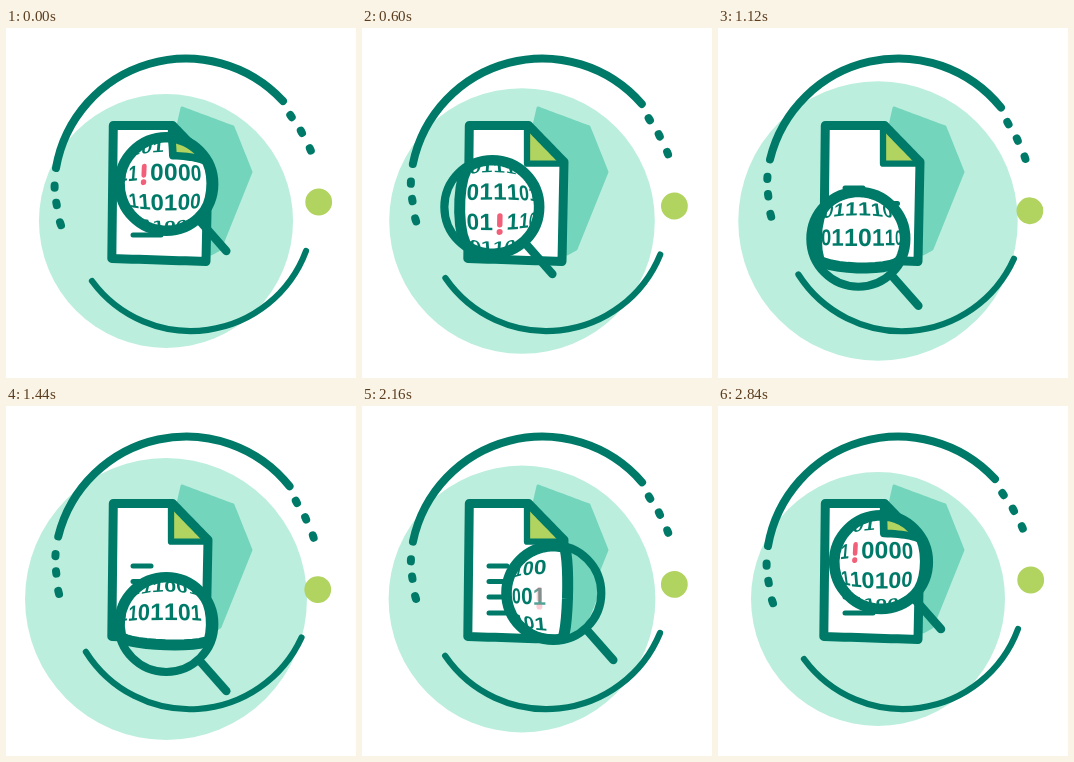
Write an HTML page with a canvas that moves like this. It is 350 px wide and 350 px high and loops after 2880 ms.

```html
<!DOCTYPE html>
<html lang="en">
<head>
<meta charset="utf-8">
<title>Code inspection</title>
<style>
  html, body { margin: 0; width: 100%; height: 100%; overflow: hidden; background: #fff; }
  canvas { display: block; width: 350px; height: 350px; }
</style>
</head>
<body>
<canvas id="stage"></canvas>
<script>
const SIZE = 350, LOOP = 2880, STEP = 40, SWING_LEAD = 40;
const DARK = '#007a68', MINT = '#bceedd', TEAL = '#74d5bd', LIME = '#b1d35f', PINK = '#f25f78';
const HEXAGON = [[176, 80], [227, 99], [245, 144], [214, 221], [205, 226], [160, 150]];
const SHEET = [[107.3, 97.5], [166.5, 97.5], [202, 134], [200, 233.5], [105.8, 230.5]];
const FOLD = [[165, 98], [165, 135.7], [202, 135.7]];
const LINES = [[160, 145], [175.5, 179.5], [191, 178], [207, 155]];

const ROWS = ['01101', '01110000', '01110100', '01111001', '01101101'];
const COLUMN = { start: 116.8, pitch: 9.3 }, ROW = { start: 127.3, pitch: 20.6 };
const ALERTS = [
  { row: 1, col: 3, from: 2500, to: 3280 },
  { row: 3, col: 2, from: 320, to: 960 },
  { row: 3, col: 7, from: 1600, to: 2185 }
];
const FADE = 80, ZOOM = 1.51, BULGE = 47;

const canvas = document.getElementById('stage');
const ctx = canvas.getContext('2d');
const ratio = window.devicePixelRatio || 1;
canvas.width = canvas.height = SIZE * ratio;

const clamp = v => Math.max(0, Math.min(1, v));
const turn = time => time / LOOP * Math.PI * 2;
const flat = (x, y) => [x, y];

function disc(x, y, r, color) {
  ctx.beginPath();
  ctx.arc(x, y, r, 0, Math.PI * 2);
  ctx.fillStyle = color;
  ctx.fill();
}

function stroke(path, width, color = DARK) {
  ctx.lineWidth = width;
  ctx.strokeStyle = color;
  ctx.stroke(path);
}

function segment(x1, y1, x2, y2, width, color) {
  const path = new Path2D();
  path.moveTo(x1, y1);
  path.lineTo(x2, y2);
  stroke(path, width, color);
}

// Edges are subdivided so that the lens can bend them.
function outline(points, map, closed) {
  const path = new Path2D(), parts = 14;
  path.moveTo(...map(...points[0]));
  const edges = closed ? points.length : points.length - 1;
  for (let i = 0; i < edges; i++) {
    const [x1, y1] = points[i], [x2, y2] = points[(i + 1) % points.length];
    for (let k = 1; k <= parts; k++) {
      const f = k / parts;
      path.lineTo(...map(x1 + (x2 - x1) * f, y1 + (y2 - y1) * f));
    }
  }
  if (closed) path.closePath();
  return path;
}

function drawHexagon(map) {
  const path = outline(HEXAGON, map, true);
  ctx.fillStyle = TEAL;
  ctx.fill(path);
  stroke(path, 3, TEAL);
}

function drawSheet(map, width, drawContent) {
  const sheet = outline(SHEET, map, true);
  ctx.fillStyle = '#fff';
  ctx.fill(sheet);
  drawContent();
  ctx.fillStyle = LIME;
  ctx.fill(outline(FOLD, map, true));
  stroke(sheet, width);
  stroke(outline(FOLD, map, false), width * 0.7);
}

function fisheye(cx, cy) {
  return (x, y) => {
    const dx = x - cx, dy = y - cy, r = Math.hypot(dx, dy);
    if (r < 0.01) return [cx + dx * ZOOM, cy + dy * ZOOM];
    const k = BULGE * Math.sin(Math.min(r * ZOOM / BULGE, Math.PI / 2)) / r;
    return [cx + dx * k, cy + dy * k];
  };
}

// Runs paint() around a local origin that is bent like the lens at (x, y).
function bent(x, y, map, alpha, paint) {
  if (alpha <= 0) return;
  const [px, py] = map(x, y);
  const [lx, ly] = map(x - 2, y), [rx, ry] = map(x + 2, y);
  const [tx, ty] = map(x, y - 2), [bx, by] = map(x, y + 2);
  ctx.save();
  ctx.transform((rx - lx) / 4, (ry - ly) / 4, (bx - tx) / 4, (by - ty) / 4, px, py);
  ctx.globalAlpha = alpha;
  paint();
  ctx.restore();
}

function drawDigit(char) {
  ctx.fillStyle = DARK;
  ctx.font = 'bold 16.6px "Liberation Sans", Arial, sans-serif';
  ctx.textAlign = 'center';
  ctx.fillText(char, 0, 5.8);
}

function drawAlert() {
  segment(0, -4.3, 0, 2, 3.7, PINK);
  disc(0, 7, 2.1, PINK);
}

function alertLevel(row, col, time) {
  const alert = ALERTS.find(a => a.row === row && a.col === col);
  if (!alert) return 0;
  const t = time < alert.from ? time + LOOP : time;
  return clamp((t - alert.from) / FADE) * clamp((alert.to - t) / FADE);
}

function drawDigits(map, cx, cy, time) {
  ROWS.forEach((text, row) => [...text].forEach((char, col) => {
    const x = COLUMN.start + col * COLUMN.pitch, y = ROW.start + row * ROW.pitch;
    if (Math.hypot(x - cx, y - cy) > 45) return;
    const level = alertLevel(row, col, time);
    bent(x, y, map, 1 - level, () => drawDigit(char));
    bent(x, y, map, level, drawAlert);
  }));
}

function drawOrbit(swing) {
  ctx.save();
  ctx.translate(181, 166);
  ctx.rotate(swing * 4.2 * Math.PI / 180);
  ctx.translate(-181, -166);
  stroke(new Path2D('M50 140A132 132 0 0 1 277 73'), 8);
  stroke(new Path2D('M86 253A122.8 122.8 0 0 0 300 223'), 6.2);
  segment(284.3, 87, 285.7, 89.2, 8);
  segment(294.8, 102.6, 296, 105, 8);
  segment(303.8, 120.2, 304.8, 122.6, 8);
  segment(48.6, 157.6, 48.6, 159.8, 8);
  segment(50.3, 174.8, 50.8, 177.2, 8);
  segment(54, 194.3, 55, 197.2, 8);
  disc(312.7, 174, 13.4, LIME);
  ctx.restore();
}

function drawLens(cx, cy, time) {
  const map = fisheye(cx, cy);
  segment(cx + 34, cy + 37.5, cx + 60, cy + 67, 8.5);
  ctx.save();
  ctx.beginPath();
  ctx.arc(cx, cy, 46, 0, Math.PI * 2);
  ctx.clip();
  ctx.fillStyle = MINT;
  ctx.fillRect(cx - 50, cy - 50, 100, 100);
  drawHexagon(map);
  drawSheet(map, 11, () => drawDigits(map, cx, cy, time));
  ctx.restore();
  ctx.beginPath();
  ctx.arc(cx, cy, 48, 0, Math.PI * 2);
  ctx.lineWidth = 8.2;
  ctx.strokeStyle = DARK;
  ctx.stroke();
}

function draw(time) {
  const angle = turn(time);
  const swing = (1 - Math.cos(turn(time + SWING_LEAD))) / 2;
  ctx.setTransform(ratio, 0, 0, ratio, 0, 0);
  ctx.fillStyle = '#fff';
  ctx.fillRect(0, 0, SIZE, SIZE);
  ctx.lineCap = ctx.lineJoin = 'round';
  disc(160, 193, 127 + 14 * swing, MINT);
  drawHexagon(flat);
  drawOrbit(swing);
  drawSheet(flat, 9, () => LINES.forEach(([y, end]) => segment(127, y, end, y, 5)));
  drawLens(160.3 - 31 * Math.sin(angle), 187 - 31 * Math.cos(angle), time);
}

const start = performance.now();
function tick() {
  const elapsed = (performance.now() - start) % LOOP;
  draw(Math.floor(elapsed / STEP) * STEP);
  requestAnimationFrame(tick);
}
tick();
</script>
</body>
</html>
```
